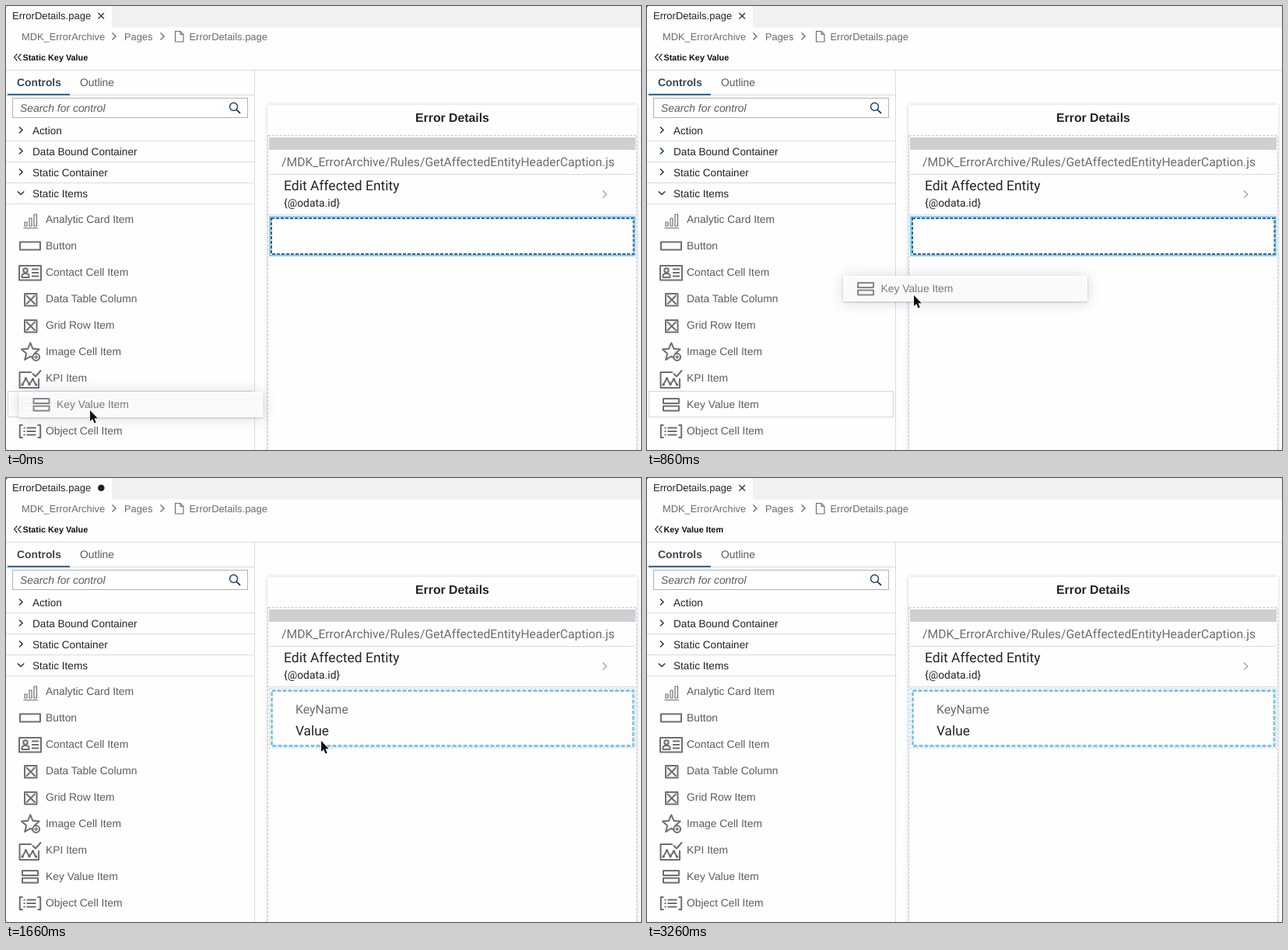
Animation, 816 px wide and 571 px high, one loop 3.76 s. Source, as an HTML page:

```html
<!DOCTYPE html>
<html lang="en">
<head>
<meta charset="utf-8">
<title>Page editor</title>
<style>
html, body { margin: 0; width: 100%; height: 100%; overflow: hidden; background: #fefefe; }
svg { display: block; width: 816px; height: 571px; }
text { font-family: "Liberation Sans", Arial, sans-serif; white-space: pre; text-rendering: geometricPrecision; }
.canvas text { font-family: Roboto, "Liberation Sans", sans-serif; }
.icon { fill: none; stroke: #6c6f73; stroke-width: 2; stroke-linejoin: round; }
</style>
</head>
<body>
<svg id="stage" viewBox="0 0 816 571" xmlns="http://www.w3.org/2000/svg"></svg>
<script>
const LOOP = 3760;
const GREY = '#6a6b6e', ITEM = '#5a5c60', DARK = '#222426', NAVY = '#1f3f5e', RULE = '#d8dce3';

const text = (x, y, size, fill, str, extra = '') =>
  `<text x="${x}" y="${y}" font-size="${size}" fill="${fill}" ${extra}>${str}</text>`;
const rect = (x, y, w, h, attrs) =>
  `<rect x="${x}" y="${y}" width="${w}" height="${h}" ${attrs}/>`;
const path = (d, stroke, width = 1.5, attrs = '') =>
  `<path d="${d}" fill="none" stroke="${stroke}" stroke-width="${width}" ${attrs}/>`;
const hline = (x1, x2, y, color = RULE) => path(`M${x1} ${y}H${x2}`, color, 1);
const box = (x, y, w, h) => `M${x} ${y}h${w}v${h}h${-w}z`;
const icon = (d, extra = '') => `<g class="icon"><path d="${d}"/>${extra}</g>`;

function star(cx, cy, r) {
  const pts = [];
  for (let i = 0; i < 10; i++) {
    const a = -Math.PI / 2 + i * Math.PI / 5, q = i % 2 ? r * 0.45 : r;
    pts.push((cx + q * Math.cos(a)).toFixed(1) + ' ' + (cy + q * Math.sin(a)).toFixed(1));
  }
  return 'M' + pts.join('L') + 'z';
}

// Icons are drawn around the left edge and text centre of their row.
const crossBox = icon(box(24, -6, 15.5, 15.5) + 'M26 -4L37.5 7.5M37.5 -4L26 7.5');
const pairIcon = icon(box(21, -7, 20, 6) + box(21, 2.5, 20, 6));
const ITEMS = [
  ['Analytic Card Item',
    `<g class="icon" style="stroke-width:1.2"><path d="${box(24, 4, 3, 5) + box(30, -1, 3, 10) + box(36, -6, 3.5, 15)}M22.5 11.5H41"/></g>`],
  ['Button', icon(box(18, -4.5, 26, 10))],
  ['Contact Cell Item', icon(box(17, -8, 28, 18.5) + 'M20.5 7v-2q0 -3 4.5 -3t4.5 3v2zM33 -3.5h9M33 1h9M33 5.5h9',
    '<circle cx="25" cy="-2" r="2.7"/>')],
  ['Data Table Column', crossBox],
  ['Grid Row Item', crossBox],
  ['Image Cell Item', icon(star(31.3, 1.2, 12),
    '<circle cx="38.7" cy="7.5" r="4.4" fill="#fefefe"/><path d="M36.2 7.5h5M38.7 5v5" stroke-width="1.4"/>')],
  ['KPI Item', icon('M33 -7H17.5V13H42V1M34 -5.5L38 -1.5L45 -9.5M21 9L25.5 1L30 8.5L34.5 2L38.5 9',
    '<path d="M21 9h.1M25.5 1h.1M30 8.5h.1M34.5 2h.1M38.5 9h.1" stroke-width="3.6" stroke-linecap="round"/>')],
  ['Key Value Item', pairIcon],
  ['Object Cell Item', icon('M21.5 -7H17.8V9H21.5M40.5 -7H44.2V9H40.5M26.5 -3.5H38.5M26.5 1H38.5M26.5 5.5H38.5M22.5 -3.5h2M22.5 1h2M22.5 5.5h2')],
];
const SECTIONS = ['Action', 'Data Bound Container', 'Static Container', 'Static Items'];

function header() {
  const chevron = x => path(`M${x} 34.5l4.5 4.5l-4.5 4.5`, GREY, 1.4);
  return rect(0, 0, 816, 27.5, 'fill="#f1f1f4"') + rect(0, 0, 136, 28, 'fill="#fefefe"') +
    text(8, 17, 13, DARK, 'ErrorDetails.page') +
    `<g id="close">${path('M118.5 9l7.5 7.5M126 9l-7.5 7.5', '#333', 1.3)}</g>` +
    '<circle id="dot" cx="122.3" cy="12.7" r="4.3" fill="#222"/>' +
    text(20, 43.5, 12.85, GREY, 'MDK_ErrorArchive') + chevron(136.5) +
    text(152, 43.5, 12.8, GREY, 'Pages') + chevron(198.5) +
    path('M217.5 32.5h6.5l4 4v9.5h-10.5zM224 32.5v4h4', GREY, 1.1) +
    text(235.5, 43.5, 12.9, GREY, 'ErrorDetails.page') +
    path('M14.5 61.5l-4 4.5l4 4.5M19.5 61.5l-4 4.5l4 4.5', '#333', 1.2) +
    text(21.5, 69.5, 10.85, '#111', '', 'id="title" font-weight="700"') +
    hline(0, 816, 82.5);
}

function sidebar() {
  let s = path('M319.5 83V571', RULE, 1) + hline(0, 319, 114.5) +
    text(14, 102.5, 13.85, '#3c4650', 'Controls', 'font-weight="700"') +
    text(95, 102.5, 13.9, ITEM, 'Outline') +
    rect(2, 112.8, 80, 2.2, 'fill="#3f6485"') +
    rect(8.5, 118.5, 302, 25, 'fill="#fff" stroke="#b0b2b5"') +
    text(18, 135.5, 13.9, ITEM, 'Search for control', 'font-style="italic"') +
    `<circle cx="292.5" cy="129.5" r="5" fill="none" stroke="${NAVY}" stroke-width="1.4"/>` +
    path('M296 133.3l5 4.7', NAVY, 1.8);
  SECTIONS.forEach((name, i) => {
    const y = 160 + 27 * i;
    s += text(34, y + 4.8, 13.6, DARK, name) + hline(0, 319, y + 13.5) +
      path(i < 3 ? `M17 ${y - 4.5}l4 4l-4 4` : `M14.8 ${y - 2.5}l4.2 4l4.2 -4`, NAVY, 1.6);
  });
  s += rect(2.5, 495.5, 314, 33, 'id="picked" fill="#fefefe" stroke="#d3d7e0"');
  ITEMS.forEach(([name, art], i) => {
    s += `<g transform="translate(0 ${274 + 34 * i})">${art}${text(51, 4.7, 13.85, ITEM, name)}</g>`;
  });
  return s;
}

function canvas() {
  return '<g class="canvas">' +
    rect(336, 127, 475, 460, 'fill="#fefefe" style="filter:drop-shadow(0 0 2px #0003)"') +
    text(573.5, 148.5, 15.8, DARK, 'Error Details',
      'font-weight="700" text-anchor="middle" style="font-family:\'Liberation Sans\',sans-serif"') +
    rect(336.5, 166.5, 474, 420, 'fill="none" stroke="#b4cbe0" stroke-dasharray="3 2"') +
    rect(338, 169, 471, 16, 'fill="#cfcfd2"') +
    text(354, 206, 15.7, '#6b6c6e', '/MDK_ErrorArchive/Rules/GetAffectedEntityHeaderCaption.js') +
    hline(337, 809, 216.5, '#dcdce0') +
    text(357, 236.5, 17.5, DARK, 'Edit Affected Entity') +
    text(357, 257.5, 13.9, DARK, '{@odata.id}') +
    path('M767 237.5l4.7 4.7l-4.7 4.7', '#9a9da1', 1.2) +
    hline(337, 809, 268.5, '#dcdce0') +
    '<g id="zone"></g>' +
    `<g id="value">${text(372, 302.5, 15.9, '#6b6c6e', 'KeyName')}${text(372, 331, 17.3, DARK, 'Value')}</g></g>`;
}

const ghost = '<g id="ghost">' +
  rect(0, 1, 314, 33, 'fill="#43457a" opacity=".2" style="filter:blur(9px)"') +
  rect(0, 0, 314, 33, 'fill="#fefefe" fill-opacity=".94" style="filter:drop-shadow(0 1px 1px #0003)"') +
  `<g opacity=".82"><g transform="translate(-2 16)">${pairIcon}</g>${text(48.5, 21, 13.85, ITEM, 'Key Value Item')}</g></g>`;

const pointer = '<g id="pointer">' +
  '<path d="M0 0V14L3.2 11L5.5 16.4L7.7 15.4L5.5 10.2H9.8z" fill="#111" stroke="#fff" stroke-width="1" paint-order="stroke"/>' +
  '<g id="badge"><circle cx="9" cy="21.5" r="9.6" fill="#23a333" stroke="#fff" stroke-opacity=".7" stroke-width=".8"/>' +
  path('M4.3 21.5h9.4M9 16.8v9.4', '#fff', 2.2) + '</g></g>';

const stage = document.getElementById('stage');
stage.innerHTML = rect(0, 0, 816, 571, 'fill="#fefefe"') + header() + sidebar() + canvas() + ghost + pointer +
  rect(0, 0, 1, 1, 'id="corner" fill="#111"');
const el = id => document.getElementById(id);
const show = (id, on) => el(id).setAttribute('display', on ? 'inline' : 'none');
const move = (id, x, y) => el(id).setAttribute('transform', `translate(${x} ${y})`);

function zone(h, selected) {
  if (selected) {
    return rect(338.5, 270.5, 470, h, 'fill="none" stroke="#bccfe2" stroke-dasharray="3 2"') +
      rect(341.5, 273.5, 464.5, h - 5.5, 'fill="#fefefe" stroke="#84c3e0" stroke-width="2.8" stroke-dasharray="5 2"');
  }
  return rect(339, 271, 469, h - 1, 'fill="#fefefe" stroke="#8ccdec" stroke-width="2"') +
    rect(341, 273, 465.5, h - 5, 'fill="none" stroke="#dceefa" stroke-width="2"') +
    rect(341, 273, 465.5, h - 5, 'fill="none" stroke="#2f6690" stroke-width="2" stroke-dasharray="4 2"');
}

// time, dragged card x and y, pointer x and y
const DRAG = [
  [0, 16.5, 496, 108, 520], [30, 22, 495, 116, 518], [60, 33, 492, 127, 516],
  [260, 65, 482, 161, 505], [460, 107, 472, 200, 496], [660, 178, 418, 269, 443.5],
  [860, 252, 347, 343, 372], [1060, 292, 296.5, 383, 320.5], [1260, 301, 290, 392, 315],
  [1460, 309, 285.5, 400, 310],
];
const DROP = 1660;

function draw(t) {
  const dragging = t < DROP;
  const [, gx, gy, px, py] = DRAG.filter(s => s[0] <= t).pop();
  move('ghost', gx, gy);
  if (dragging) move('pointer', px, py);
  else if (t < 1860) move('pointer', 405, 338);
  else move('pointer', 411.5, 379.5);
  show('ghost', dragging);
  show('picked', dragging);
  show('pointer', t < 2060);
  show('badge', dragging && t >= 1060);
  show('value', t >= 1460);
  show('corner', t >= 30);
  const dirty = !dragging && t < 2660;
  show('dot', dirty);
  show('close', !dirty);
  el('title').textContent = t < 1860 ? 'Static Key Value' : 'Key Value Item';
  el('zone').innerHTML = zone(t < 1460 ? 51 : 76.5, !dragging);
}

const start = performance.now();
function tick() {
  draw((performance.now() - start) % LOOP);
  requestAnimationFrame(tick);
}
tick();
</script>
</body>
</html>
```
